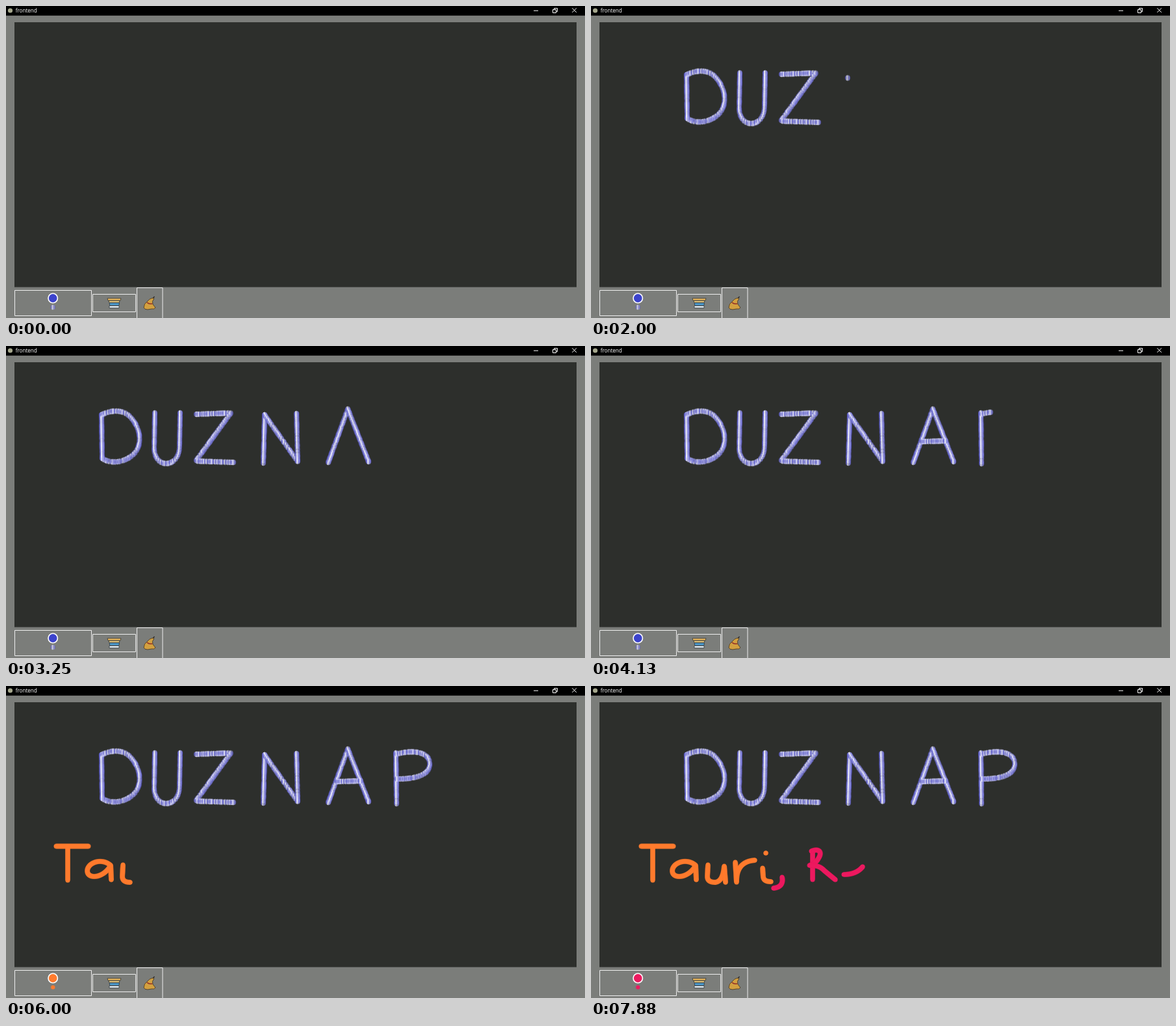
Animation of 891x480 px, one loop 8000 ms. Source, as an HTML page with a canvas:

```html
<!DOCTYPE html>
<html>
<head>
<meta charset="utf-8">
<style>
  html, body { margin: 0; width: 100%; height: 100%; overflow: hidden; background: #7b7d7a; }
  svg, canvas { position: absolute; left: 0; top: 0; }
  text { font: 8.1px "Open Sans", "Noto Sans", sans-serif; fill: #fff; }
</style>
</head>
<body>
<svg width="891" height="480" fill="none">
  <path fill="#000" d="M0 0H891V14.8H0z"/>
  <circle cx="6.5" cy="7" r="3.6" fill="#a5a78d"/>
  <text x="14.7" y="10.4">frontend</text>
  <path stroke="#fff" d="M812 7.2h7M841.5 5.5h5v5h-5zM843.5 5.5v-2h5v5h-2M871.3 3.3l6.6 6.6M877.9 3.3l-6.6 6.6"/>
  <path fill="#2d2f2c" d="M13 25H878V432.5H13z"/>
  <path stroke="#eee" d="M13.5 437.5h118v39h-118zM133.5 443.5h66v27h-66zM201.5 433.5h39.5v50h-39.5z"/>
  <circle id="swatch" cx="72.2" cy="449.5" r="7.2" stroke="#fff" stroke-width="1.6"/>
  <g stroke="#30363c" stroke-width=".8">
    <path fill="#e9b65a" d="M156 449.8h21l-1 3.4h-19z"/>
    <path fill="#eac878" d="M158 453.4h17l-.8 3h-15.4z"/>
    <path fill="#4d9ed2" d="M159 456.8h15.5l-.7 4h-14z"/>
    <path fill="#e4eef4" d="M159 461.2h15v3.4h-15z"/>
  </g>
  <path stroke="#302a28" stroke-width="1.4" d="M224 452l4.5-5"/>
  <path fill="#d2a040" stroke="#45331c" stroke-width=".8" d="M218 454Q223 448 228 450Q224 454 226 459L230 464Q228 467 224 466L218 467Q213 467 212 464Q212 458 218 454z"/>
  <path stroke="#942e28" stroke-width="1.7" d="M217 456q3 3 8 2"/>
</svg>
<canvas id="board" width="891" height="480"></canvas>
<script>
const LOOP = 8000, STEP = 125;
const ctx = board.getContext('2d');

function sprite(radius, paint) {
  const c = document.createElement('canvas');
  c.width = c.height = 12;
  const g = c.getContext('2d');
  g.beginPath();
  g.arc(6, 6, radius, 0, 7);
  g.clip();
  paint(g);
  return c;
}

const solid = color => sprite(3.5, g => {
  g.fillStyle = color;
  g.fillRect(0, 0, 12, 12);
});

const striped = colors => sprite(4.2, g => colors.forEach((color, i) => {
  g.fillStyle = color;
  g.fillRect(1.5 + i, 0, 1, 12);
}));

const BLUE = '#3c43cc', ORANGE = '#ff7b2e', PINK = '#ec1a60';
const blueStripes = striped(['#5858c0', '#6464cc', '#8888e0', '#fff', '#fff', '#6060cc', '#b8b8f4', '#7070d4', '#5858c0']);
const orangeStripes = striped([ORANGE, ORANGE, '#e39a78', '#fff', '#e8eaff', '#7888d8', '#eea078', ORANGE, ORANGE]);
const orange = solid(ORANGE), pink = solid(PINK);

// [start ms, end ms, path, brush]
const strokes = [
  [125, 375, 'M147 106L148 172', blueStripes],
  [440, 850, 'M147 106C160 99 180 96 192 110C210 130 210 158 192 170C178 180 160 181 148 173', blueStripes],
  [1050, 1400, 'M229 103L228 158C229 190 267 188 267 154L268 103', blueStripes],
  [1500, 1850, 'M293 105L346 103L292 177L350 179', blueStripes],
  [2100, 2320, 'M398 106L396 180', blueStripes],
  [2430, 2750, 'M398 106L449 178L447 104', blueStripes],
  [2900, 3250, 'M496 179L526 97L558 178', blueStripes],
  [3400, 3620, 'M510 147L546 146', blueStripes],
  [3760, 3980, 'M600 103L601 181', blueStripes],
  [4080, 4375, 'M600 105C632 96 654 104 652 122C650 138 628 143 602 143', blueStripes],
  [5125, 5250, 'M77 246.5H127', orange],
  [5320, 5450, 'M95 247L95 299', orange],
  [5520, 5750, 'M161 276C148 264 126 271 125 284C125 298 150 296 161 276L162 298', orange],
  [5810, 6000, 'M180 275L179 293Q179 302 191 302', orange],
  [6000, 6125, 'M191 302Q203 301 205 277L207 302', orange],
  [6200, 6400, 'M222 271L224 302Q223 270 252 268', orange],
  [6480, 6620, 'M264 280L265 294Q266 301 277 301', orange],
  [6700, 6750, 'M269 257h.1', orange],
  [7125, 7250, 'M294 294Q297 309 281 311', pink],
  [7330, 7450, 'M341 254L341 298', pink],
  [7480, 7670, 'M339 254C352 249 356 256 350 265Q346 273 336 276Q351 275 359 284L376 298', pink],
  [7750, 7875, 'M389 290Q408 290 418 278', pink],
].map(([start, end, d, brush]) => ({ start, end, brush, dots: stampPoints(d, brush === blueStripes) }));

// Uneven spacing of the striped stamp gives the chalky bands.
function stampPoints(d, uneven) {
  const path = document.createElementNS('http://www.w3.org/2000/svg', 'path');
  path.setAttribute('d', d);
  const length = path.getTotalLength(), dots = [];
  let seed = d.length * 97;
  const random = () => (seed = (seed * 16807 + 11) % 2147483647) / 2147483647;
  for (let at = 0; at < length; at += uneven ? 1.5 + 3.5 * random() : 1) {
    const { x, y } = path.getPointAtLength(at);
    dots.push({ x, y, part: at / length });
  }
  const { x, y } = path.getPointAtLength(length);
  dots.push({ x, y, part: 1 });
  return dots;
}

function stamp(brush, x, y, scale = 1) {
  const size = 12 * scale;
  ctx.drawImage(brush, x - size / 2, y - size / 2, size, size);
}

function drawHover(t) {
  const i = strokes.findIndex(s => s.start > t);
  if (i < 1) return;
  const prev = strokes[i - 1], next = strokes[i], gap = next.start - prev.end;
  if (t <= prev.end || gap > 350) return;
  const k = 1 - (1 - (t - prev.end) / gap) ** 3;
  const a = prev.dots.at(-1), b = next.dots[0];
  stamp(next.brush, a.x + (b.x - a.x) * k, a.y + (b.y - a.y) * k);
}

function draw() {
  const t = Math.floor(performance.now() % LOOP / STEP) * STEP;
  ctx.clearRect(0, 0, 891, 480);
  for (const { start, end, brush, dots } of strokes) {
    if (t <= start) break;
    const done = (t - start) / (end - start);
    for (const p of dots) if (p.part <= done) stamp(brush, p.x, p.y);
  }
  drawHover(t);
  const [color, brush] = t < 4750 ? [BLUE, blueStripes]
    : t < 5125 ? [ORANGE, orangeStripes]
    : t < 7000 ? [ORANGE, orange] : [PINK, pink];
  swatch.setAttribute('fill', color);
  stamp(brush, 72.2, 463.5, 0.9);
  requestAnimationFrame(draw);
}
draw();
</script>
</body>
</html>
```
